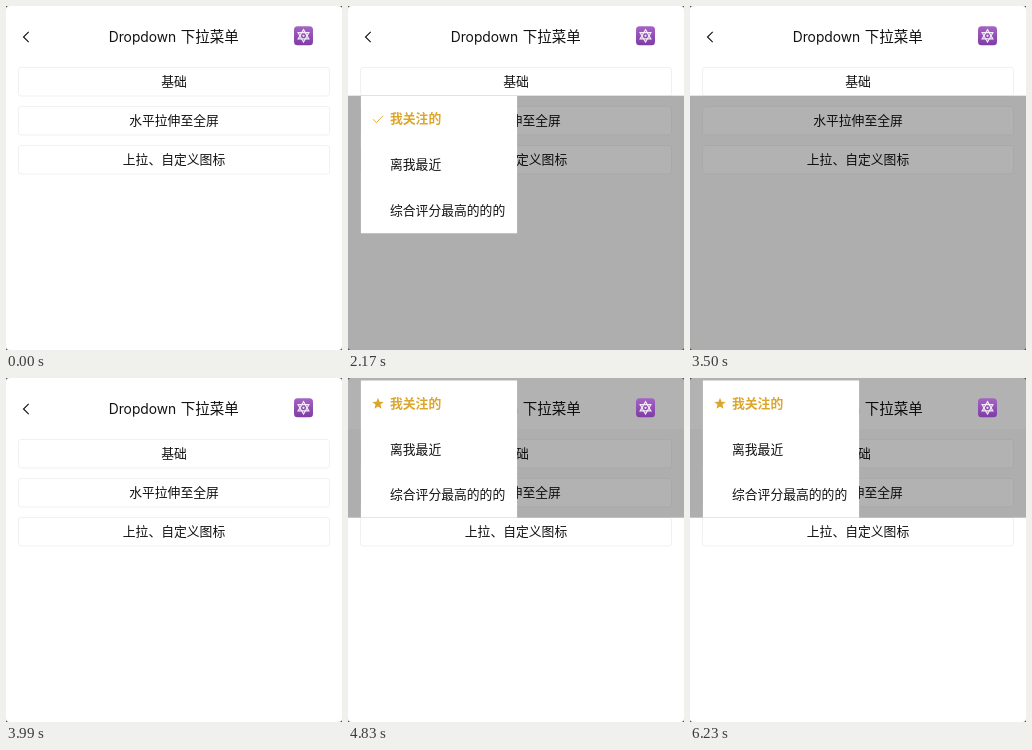
An HTML page with a canvas that plays this animation: 336x344 px, repeating every 6510 ms.

```html
<!DOCTYPE html>
<html lang="zh-CN">
<head>
<meta charset="utf-8">
<title>Dropdown 下拉菜单</title>
<style>
html, body { margin: 0; width: 100%; height: 100%; overflow: hidden; background: #fff; }
canvas { display: block; width: 336px; height: 344px; }
</style>
</head>
<body>
<canvas></canvas>
<script>
const W = 336, H = 344, LOOP = 6510, STEP = 70;
const CJK = '"Noto Sans CJK SC", "Noto Sans CJK", sans-serif';
const GOLD = '#dca62b';
const ITEMS = ['我关注的', '离我最近', '综合评分最高的的的'];
const BUTTONS = [
  { label: '基础', y: 62 },
  { label: '水平拉伸至全屏', y: 101 },
  { label: '上拉、自定义图标', y: 140 }
];
// Each menu: tap time, start of closing, removal, panel extent, overlay extent
const MENUS = [
  { tap: 1386, close: 3270, end: 3570, button: 0, top: 90, size: 137.5, shade: [89.7, H], icon: check },
  { tap: 4200, close: LOOP, end: LOOP, button: 2, top: 2.3, size: 137.5, shade: [0, 139.7], up: true, icon: star }
];

const canvas = document.querySelector('canvas');
const c = canvas.getContext('2d');
const dpr = window.devicePixelRatio || 1;
canvas.width = W * dpr;
canvas.height = H * dpr;
c.scale(dpr, dpr);

const clamp = v => Math.max(0, Math.min(1, v));

function text(s, x, y, { font = '12.8px ' + CJK, color = '#111', align = 'left' } = {}) {
  c.font = font;
  c.fillStyle = color;
  c.textAlign = align;
  c.fillText(s, x, y + 4.2);
}

function path(points, close) {
  c.beginPath();
  points.forEach(([x, y]) => c.lineTo(x, y));
  if (close) c.closePath();
}

function line(points, color, width, close) {
  path(points, close);
  c.strokeStyle = color;
  c.lineWidth = width;
  c.stroke();
}

function ring(x, y, radii, n, turn = -Math.PI / 2) {
  return Array.from({ length: n }, (_, i) => {
    const a = turn + i * 2 * Math.PI / n, r = radii[i % radii.length];
    return [x + r * Math.cos(a), y + r * Math.sin(a)];
  });
}

function check(y) {
  line([[25, y], [28.5, y + 3.5], [35, y - 3.5]], GOLD, 0.9);
}

function star(y) {
  path(ring(30, y + 0.3, [6, 2.6], 10), true);
  c.fillStyle = GOLD;
  c.fill();
}

function box(x, y, w, h, r) {
  c.beginPath();
  c.roundRect(x, y, w, h, r);
}

function header() {
  c.fillStyle = '#fff';
  c.fillRect(0, 0, W, 51);
  line([[22.7, 25.8], [17.5, 31], [22.7, 36.2]], '#111', 1.1);
  text('Dropdown', 102.7, 31.6, { font: '13.8px Inter, sans-serif' });
  text('下拉菜单', 174.7, 31.5, { font: '14.5px ' + CJK });
}

function badge() {
  const g = c.createLinearGradient(0, 20, 0, 40);
  g.addColorStop(0, '#a565c4');
  g.addColorStop(1, '#7d3aa5');
  box(288, 20.3, 19, 19, 3.5);
  c.fillStyle = g;
  c.fill();
  for (const turn of [-Math.PI / 2, Math.PI / 2])
    line(ring(297.5, 29.8, [6.2], 3, turn), '#f4ecf8', 1.2, true);
  c.beginPath();
  c.arc(297.5, 29.8, 1.1, 0, 7);
  c.fillStyle = '#f4ecf8';
  c.fill();
}

function button({ label, y }, ripple) {
  box(12.5, y - 0.5, 311, 28.5, 2.5);
  c.fillStyle = '#fff';
  c.fill();
  c.strokeStyle = '#f1f1f1';
  c.lineWidth = 1;
  c.stroke();
  if (ripple) {
    c.save();
    box(13, y, 310, 28, 2.5);
    c.clip();
    c.beginPath();
    c.arc(168, y + 14, ripple.r, 0, 7);
    c.fillStyle = `rgba(0,0,0,${ripple.a})`;
    c.fill();
    c.restore();
  }
  text(label, 168, y + 14, { align: 'center' });
}

function rippleAt(u) {
  if (u < 27 || u > 550) return null;
  return { r: 0.75 * (u - 27), a: 0.1 * (1 - clamp((u - 220) / 330)) };
}

function shade(m, color) {
  c.fillStyle = color;
  c.fillRect(0, m.shade[0], W, m.shade[1] - m.shade[0]);
}

function panel(m, t) {
  const u = t - m.tap;
  const leave = clamp((t - m.close) / 200);
  const open = (1 - (1 - clamp(u / 160)) ** 2) * (1 - leave ** 2);
  if (open <= 0) return;
  const h = m.size * open;
  const top = m.up ? m.top + m.size - h : m.top;
  const slide = 120 * (1 - clamp(u / 216)) ** 2 + 60 * leave ** 2;
  const y0 = m.top + 23.2 + (m.up ? slide : -slide);
  const fade = clamp(u / 480) * (1 - leave);

  c.save();
  c.beginPath();
  c.rect(12.7, top, 156.6, h);
  c.clip();
  c.globalAlpha = open;
  c.fillStyle = '#fff';
  c.fillRect(12.7, top, 156.6, h);
  c.globalAlpha = fade;
  ITEMS.forEach((s, i) => text(s, 42, y0 + i * 45.8,
    i ? {} : { font: 'bold 12.8px ' + CJK, color: GOLD }));
  c.globalAlpha = clamp((u - 140) / 340) * (1 - leave);
  m.icon(y0);
  c.restore();
}

function corners() {
  c.beginPath();
  c.rect(0, 0, W, H);
  c.roundRect(0, 0, W, H, 3);
  c.fillStyle = '#444';
  c.fill('evenodd');
}

function draw(t) {
  const active = MENUS.find(m => t >= m.tap && t < m.end);
  c.fillStyle = '#fff';
  c.fillRect(0, 0, W, H);
  if (active) shade(active, '#f9f9f9');
  header();
  BUTTONS.forEach((b, i) =>
    button(b, active && active.button === i && rippleAt(t - active.tap)));
  if (active) {
    shade(active, 'rgba(0,0,0,.3)');
    panel(active, t);
  }
  badge();
  corners();
}

const start = performance.now();
function tick() {
  const t = (performance.now() - start) % LOOP;
  draw(Math.floor(t / STEP) * STEP);
  requestAnimationFrame(tick);
}
tick();
</script>
</body>
</html>
```
